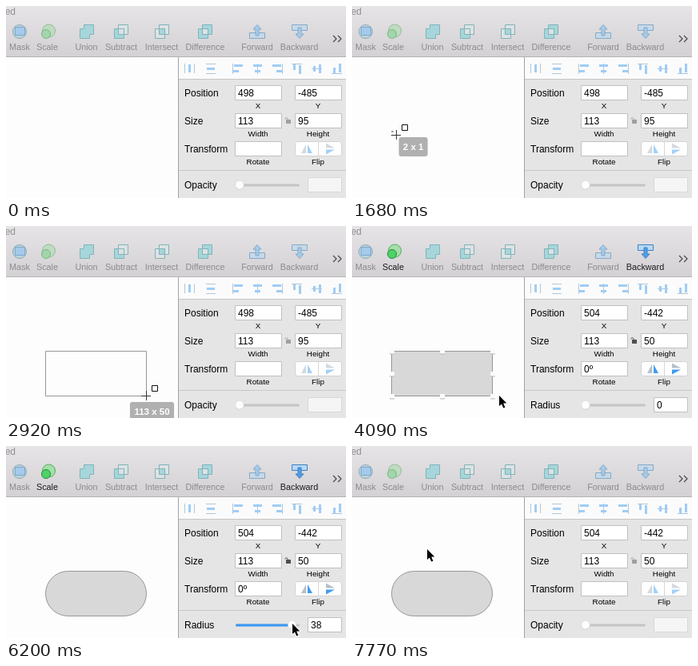
Animation, 425 px wide and 240 px high, one loop 8000 ms. Source, as an HTML page with a canvas:

```html
<!DOCTYPE html>
<html lang="en">
<head>
<meta charset="utf-8">
<title>Drawing a rounded rectangle</title>
<style>
  html, body { margin: 0; width: 100%; height: 100%; overflow: hidden; background: #fff; }
  canvas { display: block; width: 425px; height: 240px; }
</style>
</head>
<body>
<canvas width="425" height="240"></canvas>
<script>
const ctx = document.querySelector('canvas').getContext('2d');
const FONT = '"Liberation Sans", Arial, sans-serif';
const LOOP = 8000;
const STEP = 88.4;
const ZOOM = 1.115;     // canvas pixels per document unit
const LEFT = 49.5, TOP = 156.5;

// Moments of the story, counted in steps
const CROSS_IN = 3, DRAG = 19, RELEASE = 40, ARROW_IN = 41, SLIDE = 58, LEAVE = 76, DESELECT = 83;

const ramp = (n, from, to) => Math.min(1, Math.max(0, (n - from) / (to - from)));
const lerp = (a, b, k) => a + (b - a) * k;

// Drawing helpers
function paint(fillColor, lineColor, width = 1) {
  if (fillColor) { ctx.fillStyle = fillColor; ctx.fill(); }
  if (lineColor) { ctx.strokeStyle = lineColor; ctx.lineWidth = width; ctx.stroke(); }
}
function fill(color, x, y, w, h) {
  ctx.fillStyle = color;
  ctx.fillRect(x, y, w, h);
}
function box(x, y, w, h, fillColor, lineColor, radius = 0) {
  ctx.beginPath();
  ctx.roundRect(x, y, w, h, radius);
  paint(fillColor, lineColor);
}
function circle(x, y, r, fillColor, lineColor) {
  ctx.beginPath();
  ctx.arc(x, y, r, 0, Math.PI * 2);
  paint(fillColor, lineColor);
}
function shape(path, fillColor, lineColor, width) {
  ctx.beginPath();
  for (const [x, y] of path) ctx.lineTo(x, y);
  ctx.closePath();
  paint(fillColor, lineColor, width);
}
function text(string, x, y, size = 12, color = '#000', align = 'left', weight = 400) {
  ctx.font = `${weight} ${size}px ${FONT}`;
  ctx.textAlign = align;
  ctx.fillStyle = color;
  ctx.fillText(string, x, y);
}
function at(x, y, drawing, angle = 0, flip = 1) {
  ctx.save();
  ctx.translate(x, y);
  ctx.rotate(angle);
  ctx.scale(1, flip);
  drawing();
  ctx.restore();
}

// Toolbar icons, drawn around their own centre
const TEAL = '#a6d6da', PALE = '#dde2e3';

function maskIcon() {
  circle(0, 0, 8.5, '#bdd2da', '#8eabb8');
  box(-5.5, -5.5, 12, 10, '#a4caec', '#7ea9cc');
}
function scaleIcon(active) {
  circle(1.5, -1, 8, active ? '#a5dfaa' : '#bedcc1', active ? '#55ad63' : '#93bd98');
  circle(-2, 3, 5.5, active ? '#4fd367' : '#a2d6aa', active ? '#23893a' : '#7eb387');
}
const overlapIcon = (back, front, overlap, merged) => () => {
  const line = '#7fb3bb';
  box(-3.5, -8.5, 12, 12, back, line);
  box(-8.5, -3.5, 12, 12, front, line);
  box(-3.5, -3.5, 7, 7, overlap, merged ? overlap : line);
};
const orderIcon = flip => active => at(0, 0, () => {
  const line = active ? '#3f7fc0' : '#86a9c8';
  box(-9.5, 1.5, 19, 7, active ? '#b4d9f7' : '#c6d9e8', line);
  shape([[0, -8.5], [5, -3], [2, -3], [2, 5], [-2, 5], [-2, -3], [-5, -3]],
    active ? '#4f9fe8' : '#a3cbec', line);
}, 0, flip);

const TOOLS = [
  ['Mask', 17, maskIcon], ['Scale', 51.5, scaleIcon],
  ['Union', 100.5, overlapIcon(TEAL, TEAL, TEAL, true)],
  ['Subtract', 144, overlapIcon(PALE, TEAL, PALE)],
  ['Intersect', 194.5, overlapIcon(PALE, PALE, TEAL)],
  ['Difference', 249, overlapIcon(TEAL, TEAL, PALE)],
  ['Forward', 314, orderIcon(1)], ['Backward', 366.5, orderIcon(-1)]
];

function drawToolbar(selected) {
  const shade = ctx.createLinearGradient(0, 0, 0, 63);
  shade.addColorStop(0, '#e6e4e6');
  shade.addColorStop(1, '#d3d1d3');
  fill(shade, 0, 0, 425, 63);
  fill('#b4b2b4', 0, 63, 425, 1);
  text('ed', 12, 11, 12, '#918f91', 'right');
  for (const [name, x, icon] of TOOLS) {
    const active = selected && /Scale|Backward/.test(name);
    at(Math.round(x), 32, () => icon(active));
    text(name, x, 55, 10.8, active ? '#1c1c1c' : '#8c8a8c', 'center');
  }
  ctx.beginPath();
  for (const x of [409, 415]) {
    ctx.moveTo(x, 37);
    ctx.lineTo(x + 4, 41);
    ctx.lineTo(x, 45);
  }
  paint(null, '#4a4a4a', 1.2);
}

function drawAlignBar() {
  const bar = '#9fcdf6', guide = '#b3c6d6';
  fill('#fbfbfb', 216, 64, 209, 27);
  fill('#c6c6c6', 216, 91, 209, 1);
  const distribute = () => {
    fill(guide, -6, -6, 1, 12);
    fill(guide, 6, -6, 1, 12);
    fill(bar, -1, -5, 3, 10);
  };
  at(229, 78, distribute);
  at(256, 78, distribute, Math.PI / 2);
  for (let i = 0; i < 6; i++) {
    const side = i % 3 - 1;
    at(289 + i * 25, 78, () => {
      fill(guide, side * 6, -6, 1, 13);
      fill(bar, side * (5 - 6) - 5, -5, 11, 3);
      fill(bar, side * 2 - 3, 2, 7, 3);
    }, i < 3 ? 0 : Math.PI / 2);
  }
}

function field(x, y, value, w = 58) {
  box(x + .5, y + .5, w, 18, '#fff', '#c0c0c0');
  text(value, x + 4, y + 14);
}

function drawLock(color) {
  fill(color, 350, 142, 6, 5);
  ctx.beginPath();
  ctx.arc(350.5, 141.5, 1.7, Math.PI, 0);
  ctx.lineTo(352, 143);
  paint(null, color);
}

function drawFlip(selected) {
  box(361.5, 169.5, 58, 18, '#fefefe', '#d2d2d2', 3);
  fill('#d6d6d6', 390, 170, 1, 17);
  const mirror = () => {
    shape([[-1, -6], [-1, 5], [-7, 5]], selected ? '#b5c0c9' : '#d3dae0');
    shape([[1, -6], [1, 5], [7, 5]], selected ? '#3f9bef' : '#a3d0f7');
  };
  at(376, 179, mirror);
  at(405, 178.5, mirror, Math.PI / 2);
}

function drawSlider(selected, radius) {
  text(selected ? 'Radius' : 'Opacity', 223, 228);
  const thumb = thumbX(radius);
  box(287, 222.5, 80, 3, '#c4c4c4', null, 1.5);
  if (radius) box(287, 222.5, thumb - 287, 3, '#3b99f5', null, 1.5);
  circle(thumb, 224, 5.5, '#d0d0d0');
  circle(thumb, 223.7, 5, '#fdfdfd');
  if (selected) field(377, 214, Math.round(radius), 42);
  else box(377.5, 214.5, 42, 18, '#f5f5f5', '#d8d8d8');
}

function drawPanel(drawn, selected, radius) {
  fill('#e5e5e5', 216, 64, 209, 176);
  fill('#a3a3a3', 215, 64, 1, 176);
  drawAlignBar();
  const rows = [
    ['Position', drawn ? '504' : '498', 'X', drawn ? '-442' : '-485', 'Y'],
    ['Size', '113', 'Width', drawn ? '50' : '95', 'Height'],
    ['Transform', selected ? '0º' : '', 'Rotate', '', 'Flip']
  ];
  rows.forEach(([name, first, firstLabel, second, secondLabel], i) => {
    const y = 99 + i * 35;
    text(name, 223, y + 14);
    field(286, y, first);
    if (second) field(361, y, second);
    text(firstLabel, 315, y + 29, 9.8, '#000', 'center');
    text(secondLabel, 390, y + 29, 9.8, '#000', 'center');
  });
  drawLock(selected ? '#505050' : '#a0a0a0');
  drawFlip(selected);
  fill('#c8c8c8', 216, 205, 209, 1);
  drawSlider(selected, radius);
}

// Motion, as functions of the step count n
const thumbX = radius => 292 + radius * 1.74;

function radiusAt(n) {
  const pull = 1 - (1 - ramp(n, SLIDE - 1, 66)) ** 3.2;
  return 37 * pull + 3 * ramp(n, 69, 73);
}

function sizeAt(n) {
  const grow = ramp(n, DRAG - 1, 28) ** 1.7, adjust = ramp(n, 28, 33);
  return [104 * grow + 9 * adjust, 46 * grow + 4 * adjust];
}

function crossAt(n) {
  const enter = ramp(n, CROSS_IN, 5), settle = ramp(n, 7, 12);
  const drag = ramp(n, DRAG - 1, 28), adjust = ramp(n, 28, 33);
  return [
    18 + 47 * enter - 15 * settle + 115 * drag ** 1.4 + 10 * adjust,
    168 + 19 * enter - 31 * settle + 51 * drag + 5 * adjust
  ];
}

function arrowAt(n, radius) {
  const approach = ramp(n, 45, 54);
  if (n < SLIDE - 1) return [lerp(171, 289, approach), lerp(211, 222, approach)];
  const leave = ramp(n, LEAVE - 1, 78), rest = ramp(n, 78, 81);
  return [
    lerp(thumbX(radius), 110, leave) - 16 * rest - 7 * ramp(n, 87, 88),
    lerp(222, 158, leave) - 29 * rest
  ];
}

function drawRectangle(n, radius) {
  const [w, h] = sizeAt(n).map(v => Math.round(v * ZOOM));
  const filled = n >= RELEASE;
  box(LEFT, TOP, w, h, filled && '#d8d8d8', '#979797', Math.min(h / 2, radius * .9));
  if (!filled || n >= SLIDE) return;
  for (let i = 0; i < 9; i++) {
    if (i === 4) continue;
    const x = Math.round(LEFT + w * (i % 3) / 2), y = Math.round(TOP + h * Math.floor(i / 3) / 2);
    box(x - 3, y - 2.5, 6, 6, '#b5b5b5', null, 1);
    box(x - 3, y - 3, 6, 5.5, '#fbfbfb', null, 1);
  }
}

function drawCross(n) {
  const [x, y] = crossAt(n).map(Math.round);
  fill('#333', x - 6, y, 12, 1);
  fill('#333', x, y - 6, 1, 12);
  box(x + 7.5, y - 12.5, 7, 7, '#fff', '#111');
}

function drawBadge(n) {
  const [x, y] = crossAt(n), shift = 1 - ramp(n, DRAG, DRAG + 2);
  const label = sizeAt(n).map(Math.round).join(' x ');
  ctx.font = `12px ${FONT}`;
  const w = ctx.measureText(label).width + 10;
  const center = x + 7.5 + 14.5 * shift, top = y + 8 - 5 * shift;
  box(center - w / 2, top, w, 24, '#b0b0b0', null, 3);
  text(label, center, top + 16, 11.5, '#fff', 'center', 700);
}

function drawArrow() {
  const outline = [[0, 0], [0, 13], [3, 10.4], [5.2, 15.6], [7.4, 14.7], [5.2, 9.6], [9.3, 9.4]];
  ctx.lineJoin = 'round';
  shape(outline, '#000', '#fff', 2);
  shape(outline, '#000');
}

function drawResize() {
  fill('#000', -3, 0, 7, 1);
  fill('#000', 0, -4, 1, 9);
  shape([[.5, -6], [3.5, -2.5], [-2.5, -2.5]], '#000');
  shape([[.5, 7], [3.5, 3.5], [-2.5, 3.5]], '#000');
}

function draw(time) {
  const n = Math.floor(time % LOOP / STEP + .05);
  const drawn = n >= RELEASE, selected = drawn && n < DESELECT;
  const radius = radiusAt(n);

  fill('#fdfdfd', 0, 0, 425, 240);
  if (n >= DRAG) drawRectangle(n, radius);
  if (n >= CROSS_IN && n < ARROW_IN) drawCross(n);
  if (n >= DRAG && !drawn) drawBadge(n);
  drawPanel(drawn, selected, selected ? radius : 0);
  drawToolbar(selected);
  if (n >= ARROW_IN) {
    const [x, y] = arrowAt(n, radius).map(Math.round);
    at(x, y, n === LEAVE + 2 ? drawResize : drawArrow);
  }
}

const began = performance.now();
(function play() {
  draw(performance.now() - began);
  requestAnimationFrame(play);
})();
</script>
</body>
</html>
```
